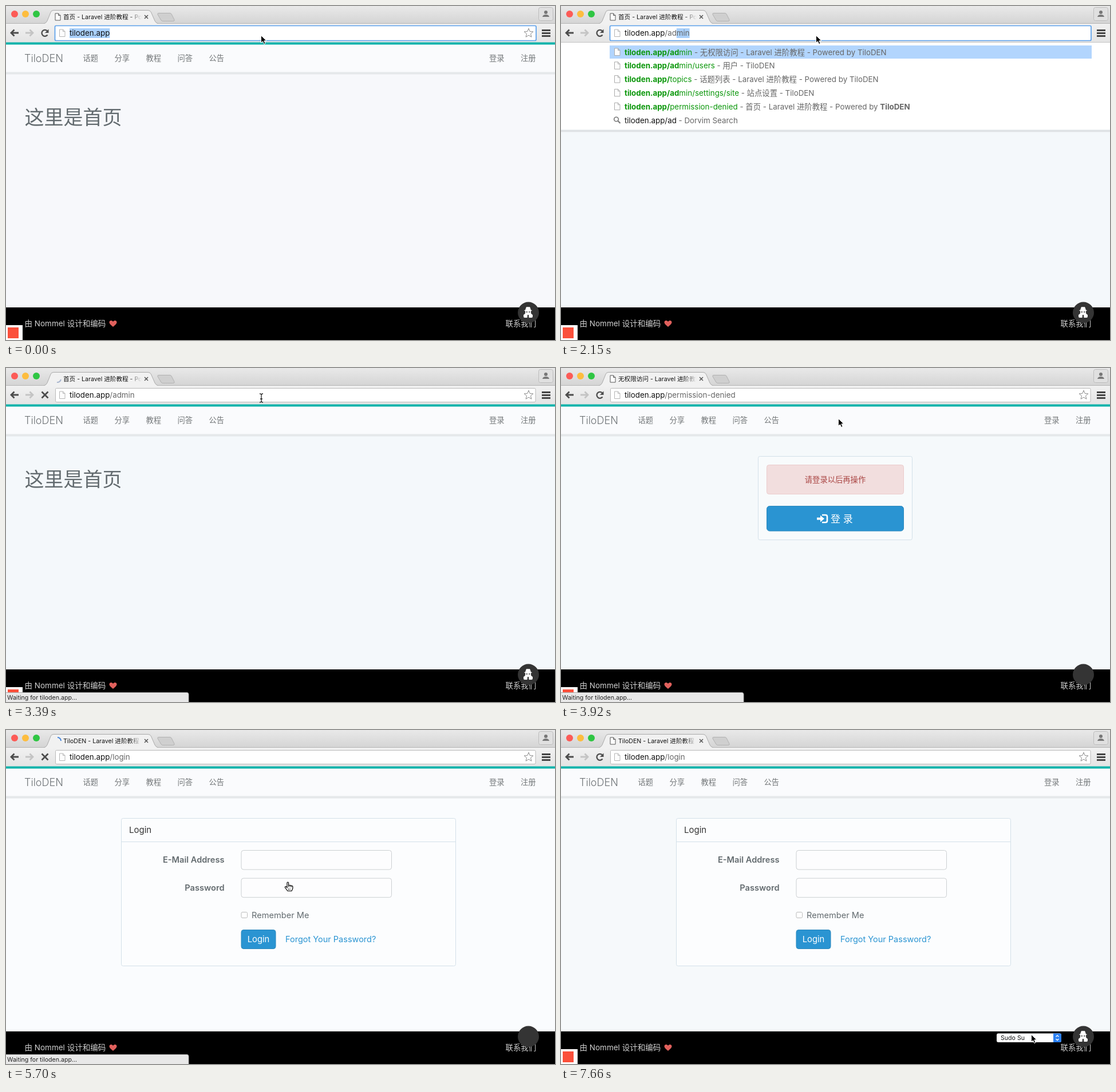
Write an HTML page that moves like this. It is 959 by 584 pixels and loops after 8000 ms.

```html
<!DOCTYPE html>
<html lang="zh">
<head>
<meta charset="utf-8">
<title>Browser login walkthrough</title>
<style>
  html, body { margin: 0; width: 100%; height: 100%; overflow: hidden; }
  svg { display: block; width: 959px; height: 584px; }
  text { font-family: Inter, "Noto Sans CJK SC", "Noto Sans CJK", sans-serif; white-space: pre; }
</style>
</head>
<body>
<svg id="stage" viewBox="0 0 959 584"></svg>
<script>
const LOOP = 8000;
const SITE = 'TiloDEN', HOST = 'tiloden.app', COURSE = 'Laravel 进阶教程';
const URL_SIZE = 13.35, GREY = '#636b6f', BLUE = '#2a94d2';
const stage = document.getElementById('stage');
const pen = document.createElement('canvas').getContext('2d');

// Timelines: each entry holds from its time until the next one.
const edits = [
  [0, null], [890, '、', ''], [1430, '', ''], [1610, '/', ''],
  [1790, '/a', 'dmin'], [2150, '/ad', 'min'], [2320, '/adm', 'in'], [2500, null]
];
const pages = [[0, 'home', '首页'], [3400, 'denied', '无权限访问'], [5520, 'login', SITE]];
const paths = [[0, ''], [2500, '/admin'], [3400, '/permission-denied'], [5340, '/login']];
const statuses = [
  [0, ''], [2860, `Waiting for ${HOST}...`], [4280, ''], [4640, HOST + '/login'],
  [5340, `Waiting for ${HOST}...`], [6230, '']
];
const backgrounds = [[0, '#f7f8fb'], [540, '#f4f8fb'], [3400, '#f5f9fb'], [5520, '#fafcfe'], [6230, '#f6f9fb']];
const mouse = [
  [0, 445, 51, 'arrow'], [2500, 446, 52, 'beam'], [3570, 447, 62, 'arrow'], [3750, 468, 78, 'arrow'],
  [3920, 484, 88, 'arrow'], [4280, 486, 120, 'arrow'], [4460, 489, 190, 'arrow'], [4640, 490, 250, 'hand'],
  [4810, 491, 266, 'hand'], [6050, 535, 300, 'arrow'], [6230, 640, 360, 'arrow'], [6410, 780, 450, 'arrow'],
  [6590, 880, 520, 'arrow'], [6760, 906, 552, 'hand'], [7300, 890, 545, 'arrow'], [7480, 850, 537, 'arrow'],
  [7660, 821, 532, 'arrow']
];
const suggestions = [
  ['/admin', `无权限访问 - ${COURSE} - Powered by ${SITE}`],
  ['/admin/users', `用户 - ${SITE}`],
  ['/topics', `话题列表 - ${COURSE} - Powered by ${SITE}`],
  ['/admin/settings/site', `站点设置 - ${SITE}`],
  ['/permission-denied', `首页 - ${COURSE} - Powered by `, SITE]
];

const at = (list, t) => list.findLast(entry => entry[0] <= t);
const within = (t, a, b) => t >= a && t < b;
const rect = (x, y, w, h, fill, more = '') =>
  `<rect x="${x}" y="${y}" width="${w}" height="${h}" fill="${fill}" ${more}/>`;
const circle = (x, y, r, fill, more = '') => `<circle cx="${x}" cy="${y}" r="${r}" fill="${fill}" ${more}/>`;
const path = (d, fill, more = '') => `<path d="${d}" fill="${fill}" ${more}/>`;
const line = (d, color, width = 1, more = '') =>
  path(d, 'none', `stroke="${color}" stroke-width="${width}" ${more}`);
const text = (x, y, size, fill, body, more = '') =>
  `<text x="${x}" y="${y}" font-size="${size}" fill="${fill}" ${more}>${body}</text>`;
const span = (body, fill, weight = 400) => `<tspan fill="${fill}" font-weight="${weight}">${body}</tspan>`;
const group = (x, y, body) => `<g transform="translate(${x} ${y})">${body}</g>`;

function urlWidth(body) {
  pen.font = `${URL_SIZE}px Inter, "Noto Sans CJK SC", "Noto Sans CJK", sans-serif`;
  return pen.measureText(body).width;
}

const defs = `<defs>
  <linearGradient id="title" x2="0" y2="1"><stop stop-color="#e9e9e9"/><stop offset="1" stop-color="#d4d4d4"/></linearGradient>
  <linearGradient id="bar" x2="0" y2="1"><stop stop-color="#f1f1f1"/><stop offset="1" stop-color="#e4e4e4"/></linearGradient>
  <linearGradient id="fade" gradientUnits="userSpaceOnUse" x1="214" x2="237" y1="0" y2="0">
    <stop stop-color="#111"/><stop offset="1" stop-color="#111" stop-opacity="0"/></linearGradient>
</defs>`;

const sheet = (x, y, color) =>
  group(x, y, path('M.5 .5H6.5L10 4V13H.5ZM6.5 .5V4H10', '#fdfdfd', `stroke="${color}"`));
const lens = y => circle(96.5, y - 1.5, 3.8, 'none', 'stroke="#777" stroke-width="1.6"') +
  line(`M99.5 ${y + 1.5}l4 4`, '#777', 2.2);
const backArrow = color => line('M14.5 -5.5L9 0l5.5 5.5M9.5 0H22', color, 2.8);

function star(cx, cy) {
  let d = '';
  for (let i = 0; i < 10; i++) {
    const r = i % 2 ? 3.7 : 8.3, a = i * Math.PI / 5;
    d += `${i ? 'L' : 'M'}${cx + r * Math.sin(a)} ${cy - r * Math.cos(a)}`;
  }
  return path(d + 'Z', '#fff', 'stroke="#8a8a8a"');
}

const cursors = {
  arrow: path('M.5 .5V13.5L3.5 10.7 5.7 15.6 8 14.6 5.9 9.8H10Z', '#000', 'stroke="#fff"'),
  beam: line('M-3 -7Q0 -7 0 -5Q0 -7 3 -7M0 -5V6M-3 8Q0 8 0 6Q0 8 3 8M-2 2H2', '#222', 1.3),
  hand: path('M0 1Q1.3 -1 2.6 1V6Q4 4.5 5.2 6Q6.7 5 7.7 6.6Q10 6 9.9 8.5V11L8 15.5H1L-3.5 9.5Q-4 7 -1.5 8L0 9.5Z',
    '#fff', 'stroke="#000" stroke-width="1.2"') + line('M2.6 6V9M5.2 6V9M7.7 6.6V9M2.5 11v3M5 11v3', '#000', .8)
};

function tabStrip(t, title, loading) {
  const spin = (Math.floor(t / 178) - 15) * 65 * (t < 3400 ? -1 : 0);
  const icon = loading
    ? line('M90 13A6 6 0 0 1 96 19', t < 3400 ? '#a9b6cf' : '#4585dc', 2, `transform="rotate(${spin} 90 19)"`)
    : path('M86 13H91.5L95 16.5V25H86ZM91.5 13V16.5H95', '#fff', 'stroke="#555"');
  return rect(0, 0, 959, 31, 'url(#title)') + line('M0 30.5H959', '#b5b5b5') +
    circle(15, 14, 6, '#fc5b57') + circle(34, 14, 6, '#fdbd3f') + circle(53, 14, 6, '#2fc643') +
    path('M66 31Q70 30 72 26L78 11Q79 7.5 83 7.5H248Q252 7.5 253.5 11L260 26Q262 30 266 31', '#f1f1f1', 'stroke="#aaa"') +
    path('M267 12.5H286Q288 12.5 289 14L294 24Q295 26.5 292 26.5H274Q272 26.5 271 25L265 15Q264 12.5 267 12.5Z', '#cfcfcf', 'stroke="#b2b2b2"') +
    rect(930.5, 2.5, 25, 23, '#e0e0e0', 'rx="3" stroke="#bcbcbc"') +
    circle(943, 11, 3, '#777') + path('M937 19Q938 15 943 15T949 19Z', '#777') +
    icon + text(100, 23, 10.6, 'url(#fade)', title) + line('M242 16l6 6M248 16l-6 6', '#555', 1.5);
}

function toolbar(t, edit, loading) {
  const focused = t < 2500;
  const [, typed, rest] = edit;
  const tail = typed === null ? at(paths, t)[1] : typed;
  const start = urlWidth(HOST + tail);
  let out = rect(0, 31, 959, 32.5, 'url(#bar)') +
    group(0, 47, backArrow('#4c4c4c')) + `<g transform="translate(56 47) scale(-1 1)">${backArrow('#c4c4c4')}</g>` +
    (loading
      ? line('M62.5 41.5l11 11M73.5 41.5l-11 11', '#4c4c4c', 2.8)
      : line('M72.5 50.5A5.5 5.5 0 1 1 72 43.5', '#4c4c4c', 2.3) + path('M74.5 40.5V47H68Z', '#4c4c4c')) +
    line('M936 42.5H951M936 47.5H951M936 52.5H951', '#444', 3) +
    (focused
      ? rect(85.5, 34.5, 840.5, 26, '#fff', 'rx="2" stroke="#5ba0ea" stroke-width="1.7"')
      : rect(86.5, 35.5, 838.5, 24, '#fff', 'rx="2" stroke="#b9b9b9"'));
  out += typed === '、' ? lens(47) : sheet(93, 40.5, '#b4b4b4');
  if (typed === null) out += star(913, 47.5);
  if (t < 540) out += rect(111, 39, start, 17, '#a9d0fb');
  if (rest) out += rect(111 + start, 39, urlWidth(HOST + tail + rest) - start, 17, '#a9d0fb');
  else if (within(t, 540, 2500)) out += rect(111 + start, 39, 1.2, 17, '#000');
  return out + text(111, 52, URL_SIZE, '#111', HOST + span(tail + (rest || ''), typed === '、' ? '#111' : '#666'));
}

function dropdown(typed) {
  const list = typed === '、' ? [] : suggestions;
  const bottom = 73.5 + 23.8 * (list.length + 1);
  const green = '#0b970b';
  let out = rect(0, bottom, 959, 4, '#dfe2e5') + rect(0, 63, 959, bottom - 63, '#fff') +
    line('M0 63.5H959', '#c4c4c4') + rect(85, 69, 842, 23, '#b2d5fd');
  list.forEach(([url, title, strong = ''], i) => {
    let same = 0;
    while (same < typed.length && typed[same] === url[same]) same++;
    const y = 80.5 + 23.8 * i;
    out += sheet(93, y - 7, '#aaa') + text(111, y + 5, URL_SIZE, '#666',
      span(HOST + url.slice(0, same), green, 700) + span(url.slice(same), green) +
      ' - ' + title + span(strong, '#666', 700));
  });
  const y = 80.5 + 23.8 * list.length;
  return out + lens(y) + text(111, y + 5, URL_SIZE, '#666', span(HOST + typed, '#111') + ' - Dorvim Search');
}

const views = {
  home: () => text(32.5, 207, 34, GREY, '这里是首页', 'font-weight="350"'),

  denied: t => rect(344.5, 154.5, 269, 146, '#f8fbfc', 'rx="3" stroke="#d3e0e9"') +
    rect(359.5, 169.5, 239, 51, '#f2dede', 'rx="4" stroke="#ebcccc"') +
    text(479, 199.5, 13.3, '#a94442', '请登录以后再操作', 'text-anchor="middle"') +
    rect(359.5, 241.5, 239, 43.5, within(t, 4640, 6050) ? '#2579a9' : BLUE, 'rx="5" stroke="#2a88bd"') +
    path('M447 261.5H453V257.5L460 263.5 453 269.5V265.5H447Z', '#fff') +
    line('M456 257H462Q465 257 465 260V267Q465 270 462 270H456', '#fff', 2.6) +
    text(471, 270, 17, '#fff', '登 录'),

  login: () => rect(201.5, 154.5, 584, 258, '#fcfdfe', 'rx="3" stroke="#d3e0e9"') +
    line('M202 195.5H785', '#d3e0e9') + text(215, 180, 15, '#333', 'Login') +
    ['E-Mail Address', 'Password'].map((label, i) =>
      text(381.5, 232 + 48.7 * i, 14.6, GREY, label, 'font-weight="600" text-anchor="end"') +
      rect(411, 210.5 + 48.7 * i, 262.5, 33.5, '#fdfdfe', 'rx="4" stroke="#ccd0d2"')).join('') +
    rect(411, 318.5, 10.5, 10, '#fff', 'rx="2" stroke="#bbb"') + text(429, 329, 14.6, GREY, 'Remember Me') +
    rect(411, 349.5, 60, 33, BLUE, 'rx="4" stroke="#2a88bd"') +
    text(441, 371, 14.8, '#fff', 'Login', 'text-anchor="middle"') +
    text(488, 371, 14.5, BLUE, 'Forgot Your Password?')
};

const agent = path('M907 532L908.5 527Q910 525.5 912 526.5Q914 525.5 915.5 527L917 532Z', '#fff') +
  '<ellipse cx="912" cy="532.3" rx="7" ry="1.3" fill="#fff"/>' +
  path('M907 533H917V536Q916.5 538 920 540V543Q920 545 918 545H906Q904 545 904 543V540Q907.5 538 907 536Z', '#fff') +
  line('M908.5 535H911M913 535H915.5', '#343434', 1.5) + path('M911 540H913L913.5 545H910.5Z', '#343434');

function page(t, view) {
  const navText = (body, x) => text(x, 95.5, 13.3, '#737779', body);
  const assetsReady = !within(t, 3400, 4100) && !within(t, 5520, 6410);
  let out = rect(0, 63, 959, 521, at(backgrounds, t)[1]) + rect(0, 115, 959, 4.5, '#e5e8ea') +
    rect(0, 67, 959, 48.5, '#fafbfd') + rect(0, 63, 959, 4.5, '#10b3ab') +
    text(32, 98, 18, '#6e7376', SITE, 'font-weight="350"') +
    ['话题', '分享', '教程', '问答', '公告'].map((label, i) => navText(label, 134.5 + 55 * i)).join('') +
    navText('登录', 844) + navText('注册', 899) + views[view](t) +
    rect(0, 527, 959, 57, '#000') + text(32.5, 560, 13.5, '#d0d0d0', '由 Nommel 设计和编码') +
    path('M187 561C182 557 180.5 555 180.5 553C180.5 549.5 185 549 187 552C189 549 193.5 549.5 193.5 553C193.5 555 192 557 187 561Z', '#e0605c') +
    text(872.5, 560, 13.4, '#d0d0d0', '联系我们') + circle(912.5, 536, 18.5, '#343434');
  if (assetsReady) out += agent;
  if (!within(t, 5520, 6050)) out += rect(0, 558, 29, 26, '#fff');
  if (!within(t, 5520, 6410)) out += rect(3, 562, 19, 19, '#fb503b');
  if (t >= 7120) {
    out += rect(761, 530.5, 113, 15.5, '#fff', 'rx="3"') +
      path('M860 530.5H871Q874 530.5 874 533.5V543Q874 546 871 546H860Z', '#2b80f2') +
      line('M864.5 536.5l2.5 -2.5 2.5 2.5M864.5 540l2.5 2.5 2.5 -2.5', '#fff', 1.3) +
      text(768, 542, 10.6, '#111', 'Sudo Su');
  }
  return out;
}

function scene(t) {
  const edit = at(edits, t), [, view, name] = at(pages, t);
  const loading = within(t, 2500, 3750) || within(t, 5340, 6050);
  const title = `${name} - ${COURSE}` + (view === 'home' ? ' - Powered by' : '');
  const status = at(statuses, t)[1];
  const [, x, y, cursor] = at(mouse, t);
  return defs + page(t, view) + tabStrip(t, title, loading) + toolbar(t, edit, loading) +
    (edit[1] === null ? '' : dropdown(edit[1])) +
    (status && path('M-1 567.5H316Q319 567.5 319 570.5V585H-1Z', '#e8e8e8', 'stroke="#aaa"') +
      text(2, 579.5, 10.6, '#222', status)) +
    group(x, y, cursors[cursor]);
}

let shown = '';
function tick() {
  const next = scene(performance.now() % LOOP);
  if (next !== shown) stage.innerHTML = shown = next;
  requestAnimationFrame(tick);
}
tick();
</script>
</body>
</html>
```
